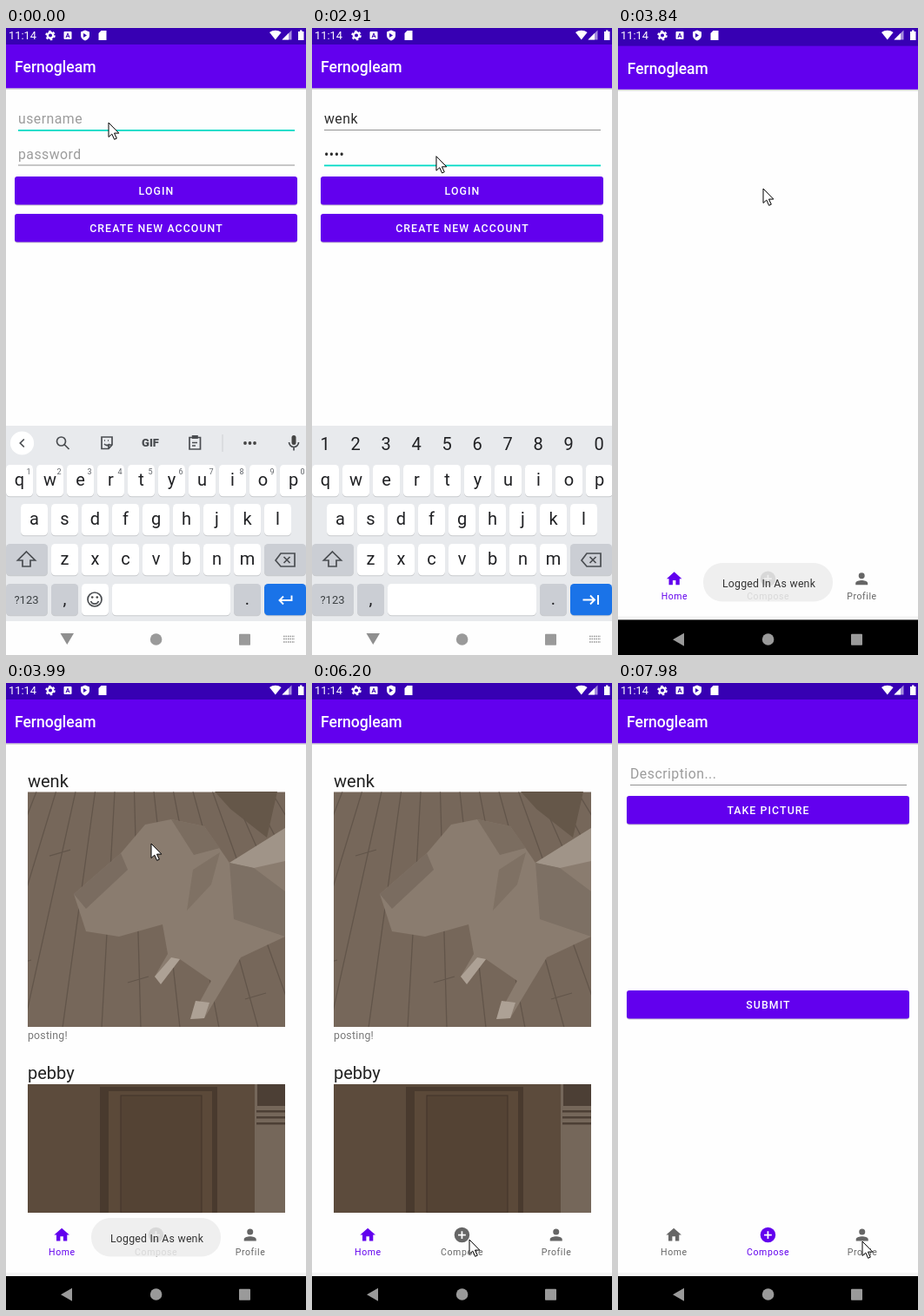
An HTML page for the animation above (8000 ms loop, 345x722 px).

```html
<!DOCTYPE html>
<html lang="en">
<head>
<meta charset="utf-8">
<title>App demo</title>
<style>
html, body { margin: 0; width: 100%; height: 100%; overflow: hidden; background: #fefefe; }
svg { display: block; width: 100vw; height: 100vh; font-family: Roboto, sans-serif; }
.mid { text-anchor: middle; }
.title { font-size: 17.57px; font-weight: 500; fill: #fff; }
.name { font-size: 20px; fill: #222; }
.field { font-size: 15.8px; letter-spacing: .03125em; fill: #2c2c2c; }
.hint { fill: #9c9c9c; }
.btn { font-size: 12.3px; font-weight: 500; letter-spacing: .0893em; fill: #fff; }
.key { font-size: 20px; fill: #202124; }
.word { font-size: 16px; fill: #333; }
.small { font-size: 12.3px; letter-spacing: .0179em; }
.tab { font-size: 10.54px; letter-spacing: .6px; }
.line { fill: none; stroke: #4a4d51; stroke-width: 1.7; }
.light { fill: none; stroke: #fff; stroke-width: 1.9; }
</style>
</head>
<body>
<svg id="stage" viewBox="0 0 345 722"></svg>
<script>
const $ = id => document.getElementById(id);
const PURPLE = '#6200ee', INDIGO = '#3700b3', TEAL = '#03dac5', GREY = '#666', PAPER = '#fefefe';
const RULE = '#929292', DARK_KEY = '#cbced4', NAV = '#9a9a9a';
const USER = 'wenk', PASS = 'tnek';

// ---------- markup helpers ----------
const text = (x, y, s, cls = '', more = '') => `<text x="${x}" y="${y}" class="${cls}" ${more}>${s}</text>`;
const rect = (x, y, w, h, fill, more = '') => `<rect x="${x}" y="${y}" width="${w}" height="${h}" fill="${fill}" ${more}/>`;
const path = (d, more = '') => `<path d="${d}" ${more}/>`;
const line = d => path(d, 'class="line"');
const poly = (pts, fill) => `<polygon points="${pts}" fill="${fill}"/>`;
const dot = (x, y, r, more = '') => `<circle cx="${x}" cy="${y}" r="${r}" ${more}/>`;
const group = (id, body) => `<g id="${id}">${body}</g>`;
const each = (list, draw) => [...list].map(draw).join('');

const button = (y, label) =>
  rect(10, y + 1, 325, 32.5, '#000', 'rx="3" opacity=".2"') + rect(10, y, 325, 32.5, PURPLE, 'rx="3"') +
  text(173, y + 20.7, label, 'btn mid');

// Backgrounds reach past the stage so the screen can shrink slightly
const appBar = () =>
  rect(-20, -20, 385, 760, PAPER) + rect(-20, 60, 385, 11, '#000', 'opacity=".15"') +
  rect(-20, 18, 385, 51.3, PURPLE) + rect(-20, -20, 385, 39, INDIGO) +
  text(10, 51, 'Fernogleam', 'title');

// ---------- keyboard ----------
const key = (x, y, w, fill = '#fff', label = '', cls = 'key') =>
  rect(x, y + 1, w, 36.3, '#000', 'rx="4.5" opacity=".14"') + rect(x, y, w, 36.3, fill, 'rx="4.5"') +
  text(x + w / 2, y + 24, label, cls + ' mid');
const row = (letters, x, y) => each(letters, (c, i) => key(x + 35 * i, y, 31, '#fff', c));
const digits = (x, y, more) => each('1234567890', (d, i) => text(x + 35 * i, y, d, 'key mid', more));

const toolbar = () =>
  dot(63.5, 476, 5, 'class="line"') + line('M67 479.5l5.500 5.500') +
  line('M110 471h12v9l-4 4.5h-8zM122 480h-4v4.5M113 479q3 3 6 0M113 475h1m3 0h1') +
  text(166, 482, 'GIF', 'mid', 'font-size="13" font-weight="900" fill="#4a4d51"') +
  line('M211 471.5h12.500v13.500h-12.500zM214 477.5h6m-6 3.500h4') + rect(213.8, 469, 7, 4, '#4a4d51') +
  rect(248.5, 468, 1, 20, '#cdd0d4') + each([275, 280.5, 286], x => dot(x, 478, 1.9, 'fill="#444"'));

const userKeys = () =>
  digits(26, 513.5, 'style="font-size:9px;fill:#5f6368"') + key(87, 640, 31) + key(122, 640, 136) +
  dot(102, 658, 8, 'class="line"') + line('M97.5 660a4.800 4.800 0 0 0 9 0') +
  each([99.2, 104.8], x => dot(x, 655.5, 1.3, 'fill="#444"')) +
  path('M328.5 653.5v5.500h-14m4.500-4.500l-4.500 4.500 4.500 4.500', 'class="light"') +
  dot(18.5, 478, 13.6, 'fill="#fff"') + line('M20.8 473.5l-4.500 4.500 4.500 4.500') +
  rect(328.5, 469, 5, 11, '#444', 'rx="2.5"') + line('M325.5 477a5.500 5.500 0 0 0 11 0m-5.500 5.500v4');

const keyboard = () =>
  rect(0, 458, 345, 225, '#e8eaed') +
  row('qwertyuiop', 0, 503) + row('asdfghjkl', 17, 548) + row('zxcvbnm', 52, 594) +
  key(0, 594, 48, DARK_KEY) + line('M23.5 603l10 10h-5.500v7h-9v-7h-5.500z') +
  key(297, 594, 48, DARK_KEY) + line('M310 613l6-8h16v15h-16zM319.5 609l7 7m0-7l-7 7') +
  key(0, 640, 48, DARK_KEY) + text(23.5, 663, '?123', 'mid', 'font-size="13" fill="#3c4043"') +
  key(52, 640, 31, DARK_KEY, ',') + key(262, 640, 31, DARK_KEY, '.') + key(297, 640, 48, '#1a73e8') +
  group('userKeys', userKeys()) + group('tools', toolbar()) +
  group('words', text(85, 484, 'we', 'word mid') + text(178, 484, '', 'word mid', 'id="typed"') +
    text(270, 484, 'went', 'word mid')) +
  group('passKeys', digits(15, 485.5) + key(87, 640, 171) +
    path('M311.5 658.5h13.500m-5-5l5 5-5 5M329 653v11', 'class="light"'));

const login = () => appBar() +
  text(14, 110, '', 'field', 'id="user"') + text(14, 151, '', 'field', 'id="pass"') +
  rect(14, 117, 318, 1, RULE, 'id="userLine"') + rect(14, 157.5, 318, 1, RULE, 'id="passLine"') +
  rect(0, 0, 1.8, 22, TEAL, 'id="caret"') +
  button(171, 'LOGIN') + rect(10, 171, 325, 32.5, '#fff', 'id="press" rx="3" opacity=".15"') +
  button(214, 'CREATE NEW ACCOUNT') + keyboard() +
  path('M62.5 697h15.500l-7.750 13z', 'fill="#8f8f8f"') +
  each([700.5, 703.5, 707], y => path(`M319 ${y}h13`, 'stroke="#999" stroke-width="1.6" stroke-dasharray="1.6 .9"'));

// ---------- feed pictures ----------
const floor = () => {
  let d = '';
  for (let i = 0; i < 14; i++) {
    const x = 45 * i - 130;
    d += `M${100 + x / 2} 125L${x + 60} 397M${x + 45} ${180 + 73 * i % 200}l24 -7`;
  }
  return rect(25, 125.5, 296, 270.5, '#76675a') +
    path(d, 'fill="none" stroke="#62554a" stroke-width="1.3" clip-path="url(#photo)"');
};
const dog = () =>
  poly('240,125 312,125 300,178 258,145', '#655749') +
  poly('78,243 132,196 160,163 190,157 228,165 257,207 321,167 321,292 270,316 228,386 212,387 236,343 200,318 178,346 171,338 186,312 180,278 130,292 92,286', '#8a7c6f') +
  poly('78,243 132,196 140,215 92,260', '#7a6c60') +
  poly('190,157 228,165 246,190 216,198', '#7b6d60') +
  poly('246,195 236,232 208,262 215,215', '#7f7164') +
  poly('257,207 321,167 321,205 285,213', '#a09488') +
  poly('257,207 285,213 321,240 321,292 262,272', '#7d7064') +
  poly('190,316 200,318 178,347 171,338', '#ada195') + poly('218,366 234,368 228,386 212,387', '#ada195');
const door = () =>
  rect(25, 462, 296, 148, '#5c4b3c') + rect(108, 465, 135, 145, '#493a2e') +
  rect(118, 470, 119, 140, '#5b4939') + rect(132, 475, 93, 135, '#544334', 'stroke="#42352a"') +
  rect(286, 462, 35, 148, '#75675a') + rect(289, 462, 32, 25, '#4c3f35') +
  each([492, 499, 506], y => rect(288, y, 33, 2.5, '#4c3f35'));

const feed = () =>
  text(25, 120, USER, 'name') + floor() + dog() + text(25, 410, 'posting!', 'small', 'fill="#777"') +
  text(25, 456, 'pebby', 'name') + door();
const compose = () =>
  text(14, 110, 'Description...', 'field hint') + rect(14, 117, 318, 1, RULE) +
  button(130, 'TAKE PICTURE') + button(354, 'SUBMIT');

// ---------- bars ----------
const icons = {
  Home: 'M10 20v-6h4v6h5v-8h3L12 3 2 12h3v8z',
  Compose: 'M12 2a10 10 0 1 0 0 20 10 10 0 0 0 0-20zm5 11h-4v4h-2v-4H7v-2h4V7h2v4h4z',
  Profile: 'M12 12a4 4 0 1 0 0-8 4 4 0 0 0 0 8zm0 2c-3 0-8 1-8 4v2h16v-2c0-3-5-4-8-4z'
};
const tabs = () => rect(-20, 610, 385, 73, PAPER) + rect(-20, 679, 385, 4, '#f5f5f5') +
  dot(179.5, 642, 37.5, 'id="ripple" fill="#e2e2e2" clip-path="url(#tabBox)"') +
  each(Object.keys(icons), (name, i) => group(name,
    path(icons[name], `transform="translate(${53.6 + 108.3 * i} 625) scale(.878)"`) +
    text(64.4 + 108.3 * i, 659, name, 'tab mid')));

const statusBar = () => text(3, 13, '11:14', '', 'font-size="12.8" fill="#fff"') + '<g fill="#fff">' +
  dot(51, 8.5, 3.2, 'fill="none" stroke="#fff" stroke-width="2.4"') +
  dot(51, 8.5, 4.9, 'fill="none" stroke="#fff" stroke-width="1.8" stroke-dasharray="2.6 2.53"') +
  rect(66.5, 4, 9, 9, '#fff', 'rx="1"') +
  text(71, 11.3, 'A', 'mid', `font-size="7.5" font-weight="700" fill="${INDIGO}"`) +
  path('M91 2.5l5 2v4q0 4-5 6-5-2-5-6v-4z') + path('M89 6l4 2.500-4 2.500z', `fill="${INDIGO}"`) +
  path('M109.5 3h6v11h-9v-8z') + path('M309.8 13.5l-6.800-8.500a11 11 0 0 1 13.600 0z') +
  path('M317.5 13.5h11v-11z', 'opacity=".55"') + path('M317.5 13.5h7.500v-7.500z') +
  path('M336 4h2v-1.500h2.500v1.500h2v10h-6.500z') + '</g>';

$('stage').innerHTML =
  `<clipPath id="photo">${rect(25, 125.5, 296, 270.5)}</clipPath>` +
  `<clipPath id="tabBox">${rect(100, 617, 145, 51)}</clipPath>` +
  group('login', login()) +
  group('main', appBar() + group('feed', feed()) + group('compose', compose()) + tabs() +
    rect(-20, 683, 385, 60, '#000')) +
  path('M63 704.3l13-7.500v15z', `id="back" fill="${NAV}"`) +
  dot(172.6, 704, 6.8, `fill="${NAV}"`) + rect(268, 697.7, 13, 13, NAV, 'rx=".8"') + statusBar() +
  group('toast', rect(98, 616, 149, 44.5, '#ededed', 'rx="22" opacity=".85"') +
    text(120, 643.7, 'Logged In As ' + USER, 'small', 'fill="#333"')) +
  path('M0 0v16.500l3.800-3.400 2.800 6.200 2.700-1.200-2.800-6h5.300z', 'id="mouse" fill="#fff" stroke="#000"');

// ---------- motion ----------
const STEP = 135;
const HOME = 3990, COMPOSE = 6610, FOCUS_PASS = 990;
const userTimes = [300, 440, 580, 860], passTimes = [1270, 1420, 1960, 2090];
const stops = [ // time, x, y
  [0, 118, 109], [2390, 118, 109], [3190, 167, 185], [4700, 167, 185], [5390, 274, 640],
  [5530, 266, 643], [6200, 181, 641], [7300, 181, 641], [7980, 281, 643]
];

// Stepped progress from 0 to 1 between two times
const ramp = (t, from, to) =>
  Math.min(1, Math.max(0, Math.floor((t - from + 5) / STEP) * STEP / (to - from)));
const within = (t, from, to) => t >= from && t < to;
const countTyped = (times, t) => times.filter(time => time <= t).length;

function mouseAt(t) {
  const i = stops.findLastIndex(stop => stop[0] <= t);
  const [t0, x0, y0] = stops[i], [t1, x1, y1] = stops[i + 1] || stops[i];
  const u = t1 > t0 ? ramp(t, t0, t1) : 0, eased = u * u * (3 - 2 * u);
  return [x0 + (x1 - x0) * eased, y0 + (y1 - y0) * eased];
}

// The newest character stays readable for a moment
function maskedPass(t) {
  const n = countTyped(passTimes, t);
  if (!n) return '';
  return '•'.repeat(n - 1) + (t - passTimes[n - 1] < 400 ? PASS[n - 1] : '•');
}

const show = (id, on) => $(id).setAttribute('display', on ? 'inline' : 'none');
const set = (id, attrs) => { for (const k in attrs) $(id).setAttribute(k, attrs[k]); };
function setField(id, value, hint, focused, caretY) {
  $(id).textContent = value || hint;
  $(id).classList.toggle('hint', !value);
  set(id + 'Line', { fill: focused ? TEAL : RULE, height: focused ? 1.8 : 1 });
  if (focused) set('caret', { x: 14 + (value && $(id).getComputedTextLength()), y: caretY });
}

function draw(t) {
  const onPass = t >= FOCUS_PASS, composing = t >= COMPOSE;
  const user = USER.slice(0, countTyped(userTimes, t));
  show('login', t < HOME);
  setField('user', user, 'username', !onPass, 93.5);
  setField('pass', maskedPass(t), 'password', onPass, 134);
  show('caret', within(t, 300, 2520) || within(t, 3050, 3450));
  $('typed').textContent = user;
  show('userKeys', !onPass);
  show('tools', !user);
  show('words', user && !onPass);
  show('passKeys', onPass);
  show('press', within(t, 3180, 3450));

  const opening = ramp(t, 3565, HOME), scale = 1 - .1 * (1 - opening) ** 3;
  set('main', {
    opacity: ramp(t, 3565, 3835),
    transform: `translate(172.5 361) scale(${scale}) translate(-172.5 -361)`
  });
  show('back', opening);
  show('feed', t >= HOME && !composing);
  show('compose', composing);
  set('Home', { fill: composing ? GREY : PURPLE });
  set('Compose', { fill: composing ? PURPLE : GREY });
  set('Profile', { fill: GREY });

  show('ripple', within(t, COMPOSE, COMPOSE + 300));
  set('ripple', { opacity: 1 - ramp(t, COMPOSE, COMPOSE + 300) });
  set('toast', { opacity: ramp(t, 3435, 3840) ** 1.3 * (1 - ramp(t, 5660, 6200)) });
  set('mouse', { transform: `translate(${mouseAt(t)})` });
}

const start = performance.now();
function tick() {
  draw((performance.now() - start) % 8000);
  requestAnimationFrame(tick);
}
tick();
</script>
</body>
</html>
```
